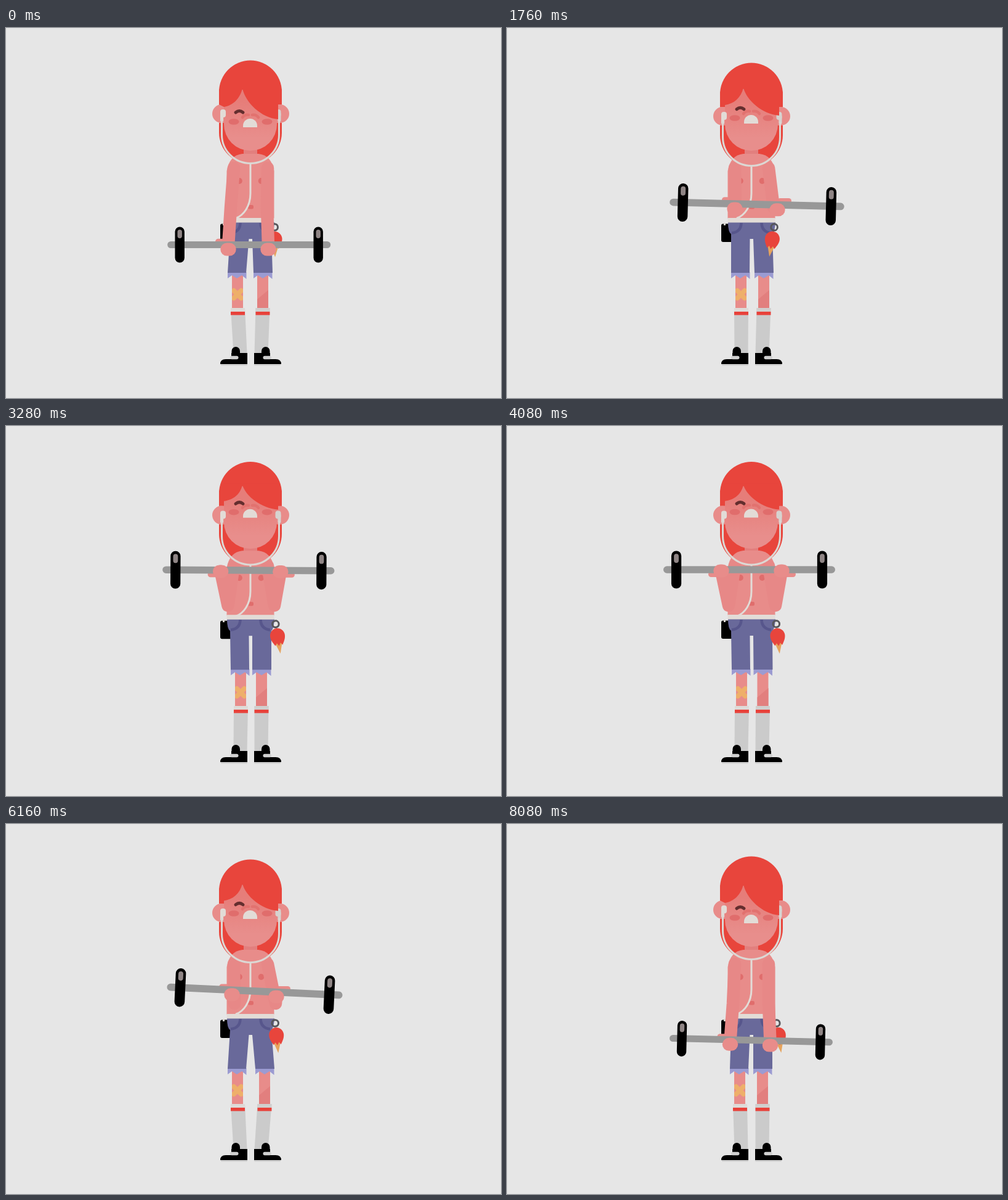
Write an HTML page with a canvas that moves like this. It is 804x600 px and loops after 8.16 s.

```html
<!DOCTYPE html>
<html lang="en">
<head>
<meta charset="utf-8">
<title>Barbell curl</title>
<style>
html, body { margin: 0; width: 100%; height: 100%; overflow: hidden; background: #e6e6e6; }
canvas { display: block; width: 804px; height: 600px; }
</style>
</head>
<body>
<canvas id="stage"></canvas>
<script>
const LOOP = 8160, STEP = 80;
const HAIR = '#e8453c', SKIN = '#e88c8a', ARM = '#e78887', SHADE = '#e27f7e', BLUSH = '#e06d6c';
const DENIM = '#69699a', FRAY = '#9b9bd2', SEAM = '#57568c', SOCK = '#cbcbcb', WHITE = '#e2dcd7';

const canvas = document.getElementById('stage');
const ratio = window.devicePixelRatio || 1;
canvas.width = 804 * ratio;
canvas.height = 600 * ratio;
const ctx = canvas.getContext('2d');

// Pose columns: bar centre, tilt and size, head drop, face shift, grip,
// hand and elbow x, leg sway and charm swing
const names = ['x', 'y', 'tilt', 'size', 'head', 'face', 'grip',
  'handL', 'handR', 'elbowL', 'elbowR', 'legL', 'legR', 'swing'];
const top_ = [393.5, 233, 0, 1.053, 5.5, -12.5, 2, 348, 446, 360, 436, 0, 0.5, -6.5];
const keys = [
  [0, 394.7, 351.5, 0, 1, 0, 0, 7.5, 361, 426, 365, 424, -5, 2, -1],
  [880, 400.5, 336, 0.8, 1.03, 0.8, -1.3, 8, 365, 431, 368, 427, -2, 2, 4],
  [1760, 406, 286, 1.45, 1.07, 4, -6, 8, 370, 439, 371, 433, -1, 2, 9.5],
  [2560, 399.5, 252, 3.7, 1.065, 6, -9, 5, 359, 443, 367, 436, 0, 0, 4.5],
  [3440, ...top_],
  [4080, ...top_],
  [5120, ...top_],
  [6160, 404, 271, 2.7, 1.077, 5, -7, 7.5, 367, 439, 371, 438, -5, 5, -6],
  [7120, 405.5, 318.7, 1.15, 1.03, 2, -2.3, 8, 370.5, 437.5, 371, 432, -5, 0, -7.5],
  [8080, 396.5, 350.7, 1.4, 1, 0, 0, 7.5, 362.5, 427.5, 367, 425, -3, 0, -9]
];

const clamp = (v, lo, hi) => Math.min(hi, Math.max(lo, v));

function key(i) {
  const n = keys.length, turn = Math.floor(i / n);
  const row = keys[i - turn * n];
  return [row[0] + turn * LOOP, ...row.slice(1)];
}

// Smooth curve through the keys without overshoot
function curve(rows, col, u) {
  const slope = j => (rows[j + 1][col] - rows[j][col]) / (rows[j + 1][0] - rows[j][0]);
  const tangent = (a, b) => a * b <= 0 ? 0 : 2 * a * b / (a + b);
  const len = rows[2][0] - rows[1][0];
  const m0 = tangent(slope(0), slope(1)) * len;
  const m1 = tangent(slope(1), slope(2)) * len;
  const a = rows[1][col], b = rows[2][col], v = 1 - u;
  return a * (1 + 2 * u) * v * v + m0 * u * v * v + b * u * u * (3 - 2 * u) - m1 * u * u * v;
}

function poseAt(t) {
  let i = keys.length - 1;
  while (keys[i][0] > t) i--;
  const rows = [key(i - 1), key(i), key(i + 1), key(i + 2)];
  const len = rows[2][0] - rows[1][0], u = (t - rows[1][0]) / len;
  const wave = period => Math.sin(Math.PI * Math.round(2 * len / period) * u);
  const p = {};
  names.forEach((name, c) => p[name] = curve(rows, c + 1, u));
  p.legL = clamp(p.legL - 2.5 * wave(480), -5, 0);
  p.legR = clamp(p.legR + 2.5 * wave(400), 0, 5);
  p.swing += 4 * wave(800);
  p.lift = Math.max(0, 4 - p.grip);
  return p;
}

const fill = (d, color) => { ctx.fillStyle = color; ctx.fill(new Path2D(d)); };

function line(d, color, width, cap = 'round') {
  ctx.strokeStyle = color;
  ctx.lineWidth = width;
  ctx.lineCap = cap;
  ctx.lineJoin = 'round';
  ctx.stroke(new Path2D(d));
}

function box(x, y, w, h, r, color) {
  ctx.fillStyle = color;
  ctx.beginPath();
  ctx.roundRect(x, y, w, h, r);
  ctx.fill();
}

function oval(x, y, rx, ry, color) {
  ctx.fillStyle = color;
  ctx.beginPath();
  ctx.ellipse(x, y, rx, ry, 0, 0, 7);
  ctx.fill();
}

function group(x, y, deg, draw) {
  ctx.save();
  ctx.translate(x, y);
  ctx.rotate(deg * Math.PI / 180);
  draw();
  ctx.restore();
}

function drawHead({ head: h, face: d }) {
  box(346, 52.5 + h, 102, 168, 51, HAIR);
  oval(350, 139 + h, 15, 15, SKIN);
  oval(445, 139 + h, 15, 15, SKIN);
  box(346, 124 + h, 10, 30, 0, SKIN);
  box(440, 124 + h, 8, 30, 0, SKIN);
  box(386, 190, 22, 20, 0, SHADE);

  const tone = ctx.createLinearGradient(0, 118, 0, 178);
  tone.addColorStop(0, '#e67d79');
  tone.addColorStop(1, '#e88e8c');
  box(354, 100 + d * 0.2, 86, 99 - d * 0.2, [0, 0, 43, 43], tone);

  box(348, 132 + h, 9, 13, 4, WHITE);
  box(348, 137 + h, 5, 15, 2, WHITE);
  box(437.5, 132 + h, 9, 13, 4, '#d6d3d0');
  box(441.5, 137 + h, 5, 15, 2, '#d6d3d0');

  oval(370, 152 + d, 8.5, 4.8, BLUSH);
  oval(424, 152 + d, 8.5, 4.8, BLUSH);
  const m = 161 + d;
  line(`M384 ${m - 16}Q388 ${m - 21} 394 ${m - 20}M400 ${m - 20}Q406 ${m - 21} 410 ${m - 16}`, '#e2726f', 4.5);
  fill(`M385 ${m}V${m - 2.5}A11.5 11.5 0 0 1 408 ${m - 2.5}V${m}Z`, WHITE);
  const e = 137 + d * 0.88;
  line(`M373 ${e}Q379 ${e - 5} 385 ${e}`, '#642e2e', 5);

  const peak = 98 + d * 0.2, left = 128 + d * 0.5, right = 148 + d;
  fill(`M346 ${100 + h}V${124 + h}L354 ${left}C368 ${left - 2} 380 ${peak + 17} 384 ${peak}
    C389 ${peak + 23 + d * 0.4} 415 ${right - 2} 442 ${right}V${124 + h}H448V${100 + h}
    L440 ${88 + h}H354Z`, HAIR);
}

function drawLeg(x, foot, inset, sockInset, plaster) {
  box(x + inset, 398, 18, 60, 0, SKIN);
  if (plaster) {
    ctx.save();
    ctx.beginPath();
    ctx.rect(x + inset, 420, 18, 26);
    ctx.clip();
    group(x + inset + 9, 432, 0, () => line('M-6 -6L6 6M6 -6L-6 6', '#eeaf6a', 8));
    ctx.restore();
  } else {
    const a = x + inset;
    fill(`M${a} 440L${a + 18} 425V457H${a}Z`, SHADE);
  }
  const s = x + sockInset;
  fill(`M${s} 454H${s + 23}L${foot + 22} 528H${foot}Z`, SOCK);
  fill(`M${s} 454H${s + 23}V460H${s}Z`, plaster ? '#dedbd8' : '#d0cfce');
  fill(`M${s} 460H${s + 23}V465.5H${s}Z`, '#e8413a');
}

function drawShoe() {
  box(349, 544, 43, 3.5, 1, '#cfcfcf');
  box(366.5, 517, 13.5, 20, 6.7, '#000');
  fill('M348 545Q348 537 357 537H366V527H392V545Z', '#000');
  box(364, 531.8, 13.5, 5.4, 2.7, '#d0d0d0');
}

function drawLegs({ legL, legR }) {
  drawLeg(365 + legL, 369.5, 7, 5, true);
  drawLeg(400 + legR, 403.5, 6, 3.5, false);
  drawShoe();
  ctx.save();
  ctx.translate(795, 0);
  ctx.scale(-1, 1);
  drawShoe();
  ctx.restore();
}

function drawBody({ legL, legR, swing, lift, head }) {
  ctx.save();
  ctx.translate(0, -lift);
  box(348, 317.5, 20, 29.5, 3, '#000');
  box(352, 316, 3, 4, 0, WHITE);

  const a = 365 + legL, b = 400 + legR;
  for (const x of [a, b])
    fill(`M${x} 396H${x + 30.5}V407L${x + 23} 401L${x + 15} 406L${x + 7} 401L${x} 406Z`, FRAY);
  fill(`M359 315H436Q435 331 431 334L${b + 31} 397H${b}L400 342H394.5L${a + 30} 397H${a}
    L364 334Q359 331 359 315Z`, DENIM);
  line('M380.5 316Q380 331 365 332.5M413.5 316Q414 331 429 332.5', SEAM, 4.5, 'butt');

  fill('M384 204H410Q431 206 435.5 232V309H358.5V232Q363 206 384 204Z', SKIN);
  oval(379, 248, 4.8, 5, BLUSH);
  oval(414.5, 248, 4.8, 5, BLUSH);
  box(393, 287, 9, 6.5, 2.5, BLUSH);
  box(358.5, 308, 77, 7.5, 0, WHITE);

  group(436 - swing * 0.2, 323, swing, () => {
    fill('M-7 27H7L0 48.5Z', '#e6a35c');
    fill('M0 7C7 7 12 13 12 19C12 26 8 31 6 35L3 31L0 36L-3 31L-6 35C-8 31 -12 26 -12 19C-12 13 -7 7 0 7Z', HAIR);
    line('M-5.3 0A5.3 5.3 0 0 1 5.3 0A5.3 5.3 0 0 1 -5.3 0', '#56565a', 3);
  });
  ctx.restore();
  line(`M397 ${220 + head}V268C397 289 386 304 373 308.5`, WHITE, 3, 'butt');
}

function drawBar(size) {
  ctx.scale(size, size);
  box(-132.5, -5.5, 265, 11, 5.5, '#989898');
  for (const x of [-112.5, 112.5]) {
    box(x - 7.7, -29, 15.4, 58, 7.7, '#000');
    box(x - 3.7, -24.5, 7.4, 14, 3.7, '#8f8585');
  }
}

function drawLift(p) {
  const slope = Math.tan(p.tilt * Math.PI / 180);
  const barY = x => p.y + (x - p.x) * slope;
  const thumb = 8 - (p.grip - 2) * 2.3;
  const reach = 23 * clamp((350 - p.y) / 25, 0, 1);

  box(p.handL - 21, barY(p.handL) + thumb - 5, 24, 9, 4.5, SKIN);
  if (reach) box(p.handR, barY(p.handR) + thumb - 5, reach, 9, 4.5, SKIN);

  const arms = [[370, p.elbowL, p.handL], [425, p.elbowR, p.handR]];
  for (const [s, e, h] of arms)
    line(`M${s} 227L${e} 291L${h} ${barY(h) + 2}`, ARM, 20.5);

  const arc = 173 + p.head;
  line(`M350.5 ${arc - 24}V${arc}A46.5 46.5 0 0 0 443.5 ${arc}V${arc - 24}`, '#dcd8d4', 3);

  group(p.x, p.y, p.tilt, () => drawBar(p.size));
  for (const [, , h] of arms) box(h - 12.7, barY(h) + p.grip - 10.5, 25.4, 21, 10.5, SKIN);
}

function draw(t) {
  const p = poseAt(t);
  ctx.setTransform(ratio, 0, 0, ratio, 0, 0);
  box(0, 0, 804, 600, 0, '#e6e6e6');
  drawHead(p);
  drawLegs(p);
  drawBody(p);
  drawLift(p);
}

const start = performance.now();
function tick() {
  const t = (performance.now() - start) % LOOP;
  draw(Math.floor(t / STEP) * STEP);
  requestAnimationFrame(tick);
}
tick();
</script>
</body>
</html>
```
